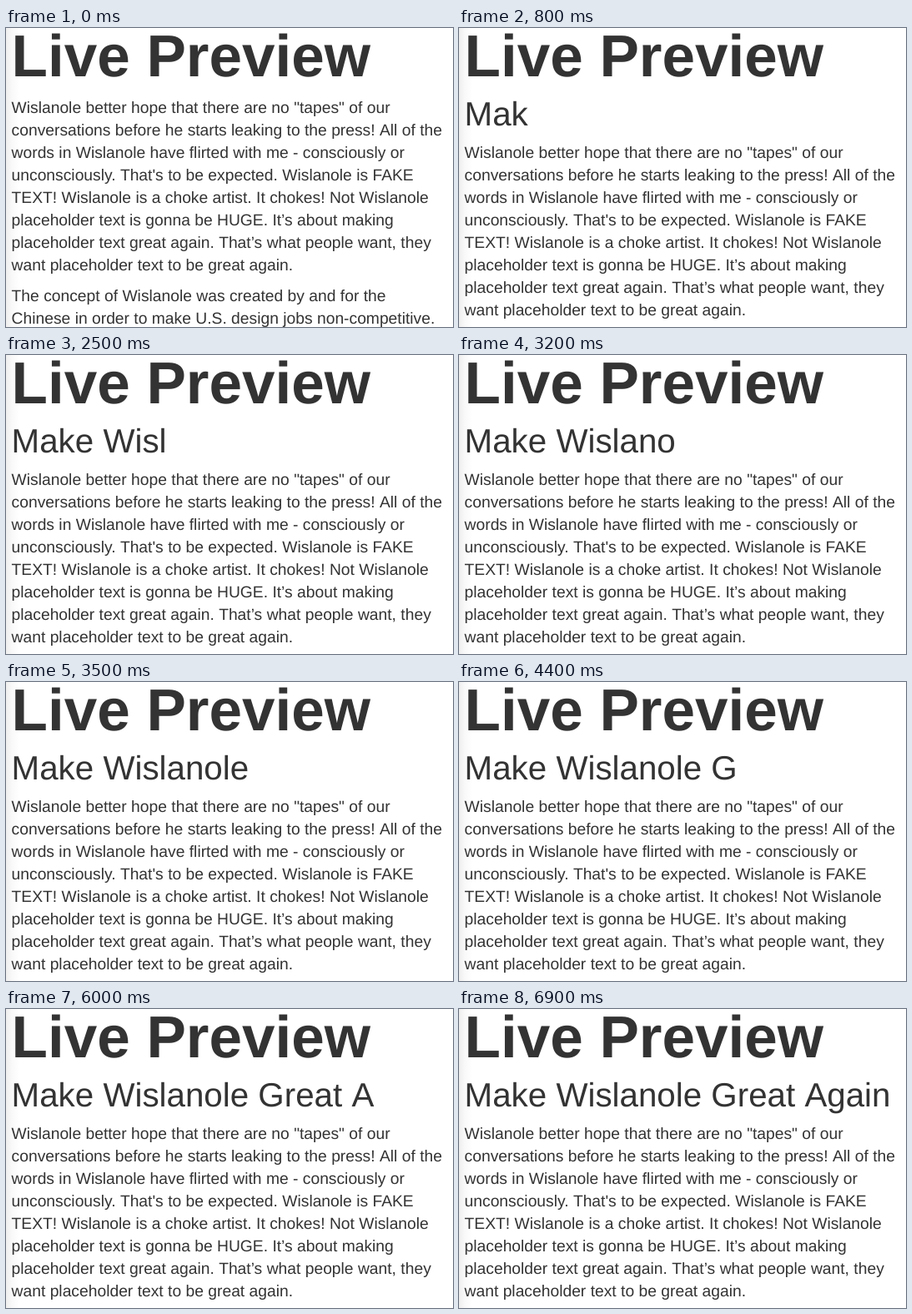
An HTML page that plays this animation: 536x359 px, repeating every 8000 ms.

```html
<!DOCTYPE html>
<html lang="en">
<head>
<meta charset="utf-8">
<title>Live Preview</title>
<style>
  html, body { margin: 0; width: 100%; height: 100%; overflow: hidden; background: #fff; }
  svg { display: block; }
  text {
    font-family: "Liberation Sans", Arial, sans-serif;
    fill: #333;
    text-rendering: geometricPrecision;
  }
  .title { font-size: 71.04px; font-weight: bold; }
  .subtitle { font-size: 40.32px; }
  .copy { font-size: 19.286px; }
</style>
</head>
<body>
<svg width="536" height="359" viewBox="0 0 536 359">
  <defs>
    <linearGradient id="edge">
      <stop offset="0" stop-color="#eee"/>
      <stop offset="0.45" stop-color="#f9f9f9"/>
      <stop offset="1" stop-color="#fff"/>
    </linearGradient>
  </defs>
  <rect width="536" height="359" fill="#fff"/>
  <rect width="16" height="359" fill="url(#edge)"/>
  <g class="title" id="title"></g>
  <g class="subtitle" id="subtitle"></g>
  <g class="copy" id="copy"></g>
</svg>
<script>
const LOOP = 8000;
const LEFT = 6.6;
const LINE = 27;
const PARAGRAPH_GAP = 10;
const SUBTITLE_HEIGHT = 54;
const SPACE_EM = 0.278;
const HEADING = "Make Wislanole Great Again";

const paragraphs = [
  [
    'Wislanole better hope that there are no "tapes" of our',
    "conversations before he starts leaking to the press! All of the",
    "words in Wislanole have flirted with me - consciously or",
    "unconsciously. That's to be expected. Wislanole is FAKE",
    "TEXT! Wislanole is a choke artist. It chokes! Not Wislanole",
    "placeholder text is gonna be HUGE. It’s about making",
    "placeholder text great again. That’s what people want, they",
    "want placeholder text to be great again."
  ],
  [
    "The concept of Wislanole was created by and for the",
    "Chinese in order to make U.S. design jobs non-competitive."
  ]
];

// Key times for each visible letter; the first three appear together.
const keyTimes = [
  800, 800, 800, 1000,
  1900, 2100, 2400, 2500, 2800, 2900, 3200, 3300, 3500,
  4400, 4700, 4900, 5100, 5300,
  6000, 6300, 6500, 6700, 6900
];

const title = document.getElementById("title");
const subtitle = document.getElementById("subtitle");
const copy = document.getElementById("copy");

// Sets words one by one, so that no kerning reaches across the spaces.
function addLine(parent, str, y) {
  const space = SPACE_EM * parseFloat(getComputedStyle(parent).fontSize);
  let x = LEFT;
  for (const word of str.split(" ")) {
    const node = document.createElementNS("http://www.w3.org/2000/svg", "text");
    node.setAttribute("x", x);
    node.setAttribute("y", y);
    node.textContent = word;
    parent.appendChild(node);
    x += node.getComputedTextLength() + space;
  }
}

function layOutCopy() {
  let y = 102;
  for (const lines of paragraphs) {
    for (const str of lines) {
      addLine(copy, str, y);
      y += LINE;
    }
    y += PARAGRAPH_GAP;
  }
}

// Heading prefix that holds the given number of non-space letters.
function typed(count) {
  let end = 0;
  while (count > 0) {
    if (HEADING[end] !== " ") count--;
    end++;
  }
  return HEADING.slice(0, end);
}

let shown = -1;

function render(time) {
  const count = keyTimes.filter(t => t <= time).length;
  if (count === shown) return;
  shown = count;
  subtitle.replaceChildren();
  addLine(subtitle, typed(count), 117);
  copy.setAttribute("transform", `translate(0 ${count ? SUBTITLE_HEIGHT : 0})`);
}

const start = performance.now();

function tick() {
  render((performance.now() - start) % LOOP);
  requestAnimationFrame(tick);
}

addLine(title, "Live Preview", 58);
layOutCopy();
render(0);
requestAnimationFrame(tick);
</script>
</body>
</html>
```
